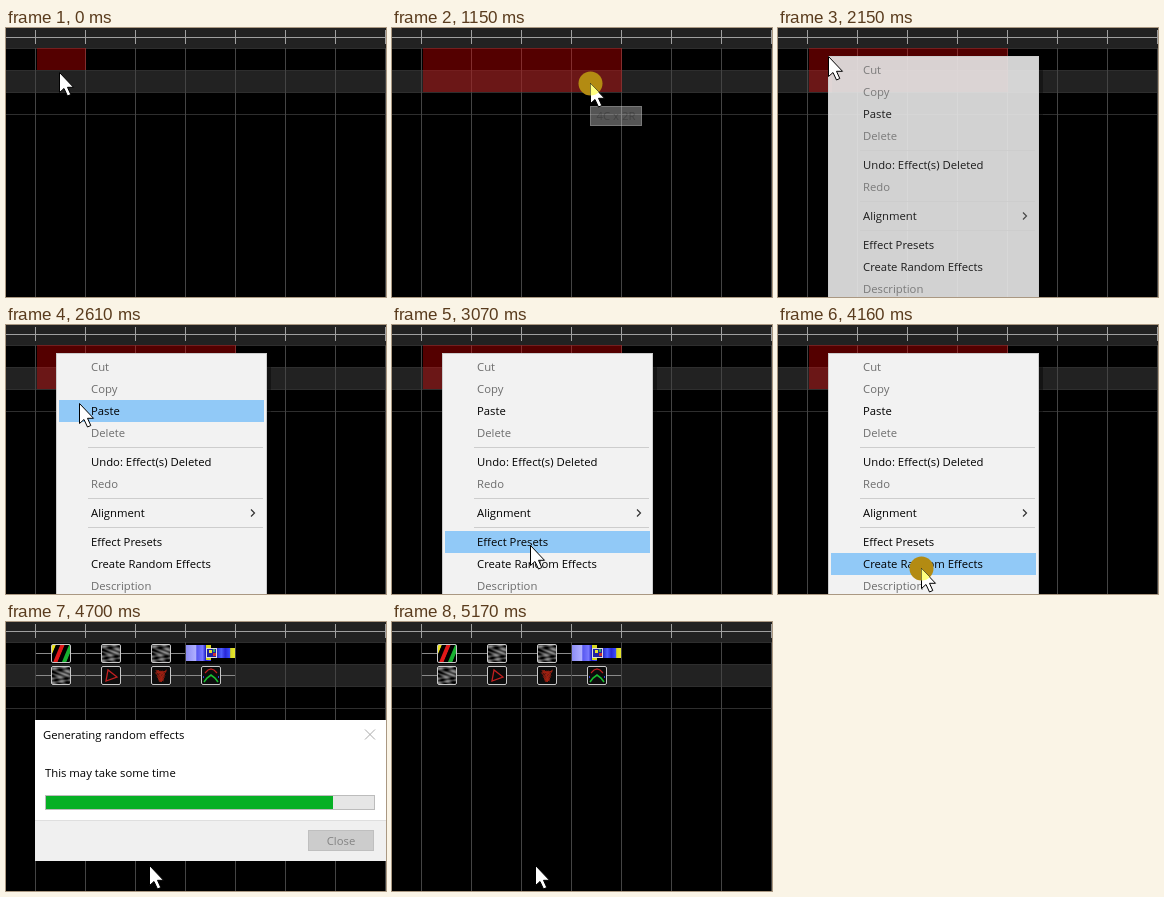
Animation of 380 by 269 pixels, one loop 6480 ms. Source, as an HTML page with a canvas:

```html
<!DOCTYPE html>
<html lang="en">
<head>
<meta charset="utf-8">
<style>
  html, body { margin: 0; width: 100%; height: 100%; overflow: hidden; background: #000; }
  canvas { display: block; }
</style>
</head>
<body>
<canvas id="stage" width="380" height="269"></canvas>
<script>
const ctx = document.getElementById('stage').getContext('2d');
const LOOP = 6480, TICK = 76.9;
const LEFT = 30, COL = 50;

// Pointer stops: tick, x, y
const stops = [
  [0, 53, 44], [4, 47, 28], [5, 47, 28], [13, 198, 55], [15, 198, 55], [23, 53, 29],
  [24, 50, 28], [31, 50, 28], [40, 138, 220], [43, 142, 242], [47, 142, 242], [48, 143, 243]
];

// Menu rows: label, middle y, enabled
const menuItems = [
  ['Cut', 42], ['Copy', 64], ['Paste', 86, true], ['Delete', 108],
  ['Undo: Effect(s) Deleted', 137, true], ['Redo', 159], ['Alignment', 188, true],
  ['Effect Presets', 217, true], ['Create Random Effects', 239, true], ['Description', 261]
];

const clamp = (v, lo = 0, hi = 1) => Math.min(hi, Math.max(lo, v));

function rect(x, y, w, h, color) {
  ctx.fillStyle = color;
  ctx.fillRect(x, y, w, h);
}

function frame(x, y, w, h, color) {
  ctx.strokeStyle = color;
  ctx.lineWidth = 1;
  ctx.strokeRect(x + .5, y + .5, w - 1, h - 1);
}

function line(points, color, width = 1) {
  ctx.beginPath();
  points.forEach(([x, y]) => ctx.lineTo(x, y));
  ctx.strokeStyle = color;
  ctx.lineWidth = width;
  ctx.stroke();
}

function text(label, x, middle, color = '#000', align = 'left') {
  ctx.font = '11.3px "Open Sans", sans-serif';
  ctx.textAlign = align;
  ctx.fillStyle = color;
  ctx.fillText(label, x, middle + 4);
}

function layer(alpha, draw) {
  ctx.save();
  ctx.globalAlpha = alpha;
  draw();
  ctx.restore();
}

function pointerAt(tick) {
  const next = stops.findIndex(s => s[0] > tick);
  if (next < 0) return stops.at(-1).slice(1);
  const [t0, x0, y0] = stops[next - 1], [t1, x1, y1] = stops[next];
  const p = (tick - t0) / (t1 - t0), ease = p * p * (3 - 2 * p);
  return [Math.round(x0 + (x1 - x0) * ease), Math.round(y0 + (y1 - y0) * ease)];
}

function drawGrid() {
  rect(0, 0, 380, 269, '#000');
  rect(0, 0, 380, 20, '#222');
  rect(0, 42, 380, 22, '#222');
  for (const y of [20, 42, 64, 86]) rect(0, y, 380, 1, '#2e2e2e');
  rect(0, 9, 380, 1, '#a0a0a0');
  for (let x = LEFT - 1; x < 380; x += COL) {
    rect(x, 20, 1, 249, '#444');
    rect(x, 2, 1, 14, '#a0a0a0');
  }
}

// Effect pictures, drawn in an 18 x 18 box
function stripes() {
  ['#e8e020', '#000', '#e01818', '#000', '#18b030', '#000', '#e8e020'].forEach((color, i) =>
    line([[i * 4.4 - 7, 21], [i * 4.4 + 3, -3]], color, 4.2));
}

function plasma() {
  for (let y = 0; y < 18; y++) for (let x = 0; x < 18; x++) {
    const v = Math.sin(x * .42 + Math.sin(y * .5) * 1.6) * Math.sin(y * .85 - x * .18 + 1);
    const g = Math.round(65 + 75 * v);
    rect(x, y, 1, 1, `rgb(${g},${g},${g})`);
  }
}

function triangle() {
  line([[6, 3], [15, 10], [4, 14], [6, 3], [15, 10]], '#c02020', 1.3);
}

function scribble() {
  const points = Array.from({ length: 34 }, (_, i) =>
    [9 + 6 * Math.sin(i * 2.3) * Math.cos(i * .4), 9 + 6 * Math.cos(i * 1.7)]);
  line(points, 'rgba(165,35,20,.75)', .8);
}

function arcs() {
  line([[3, 6], [6, 3], [9, 2], [12, 3], [15, 6]], '#c02020', 1.2);
  line([[2, 15], [5, 11], [9, 8], [13, 11], [16, 15]], '#18c030', 1.6);
  rect(1, 9, 1, 2, '#3040d0');
  rect(16, 9, 1, 2, '#3040d0');
}

function colorBar() {
  const g = ctx.createLinearGradient(0, 0, 49, 0);
  [[0, '#8c8cf4'], [.2, '#b0b0ff'], [.22, '#5858f0'], [.34, '#7878ff'], [.4, '#2020c8'],
   [.48, '#4040f0'], [.62, '#2020b8'], [.72, '#5060ff'], [.8, '#2828d8'], [.9, '#3c50ff'],
   [.91, '#d8d820'], [1, '#e8e830']].forEach(s => g.addColorStop(...s));
  rect(0, 0, 25, 16, g);
  rect(25, 3, 24, 10, g);
  rect(20, 0, 5, 15, '#d8d820');
  rect(21, 3, 10, 10, '#2020a0');
  rect(23, 5, 3, 3, '#e8e030');
  rect(27, 8, 3, 3, '#d03030');
  rect(27, 4, 2, 3, '#30b060');
  frame(20, 3, 11, 10, '#ddd');
}

const effects = [stripes, plasma, plasma, colorBar, plasma, triangle, scribble, arcs];

function drawEffect(draw, i) {
  const x = LEFT + i % 4 * COL, y = i < 4 ? 31 : 53;
  ctx.save();
  if (draw === colorBar) {
    ctx.translate(x, y - 8);
    draw();
  } else {
    rect(x, y, 49, 1, '#8a8a8a');
    ctx.translate(x + 16, y - 8);
    rect(-1, -1, 20, 19, '#0c0c0c');
    ctx.save();
    ctx.beginPath();
    ctx.rect(0, 0, 18, 17);
    ctx.clip();
    draw();
    ctx.restore();
    ctx.beginPath();
    ctx.roundRect(-.5, -.5, 19, 18, 1.5);
    ctx.strokeStyle = '#c8c8c8';
    ctx.lineWidth = 1;
    ctx.stroke();
  }
  ctx.restore();
}

function drawSelection(tick, x, y) {
  let cols = 1, rows = 1;
  if (tick >= 13) [cols, rows] = [4, 2];
  else if (tick >= 6) {
    cols = Math.floor((x - LEFT) / COL) + 1;
    rows = y > 42 ? 2 : 1;
  }
  rect(31, 20, cols * COL - 1, rows * 22, 'rgba(255,0,0,.33)');
}

function drawTooltip() {
  rect(198, 78, 52, 20, '#f4f4f4');
  frame(198, 78, 52, 20, '#bbb');
  text('4C x 2R', 224, 88, '#222', 'center');
}

function drawItem([label, middle, enabled], hovered) {
  if (hovered) rect(53, middle - 11, 205, 22, enabled ? '#91c9f7' : '#e6e6e6');
  text(label, 85, middle, enabled ? '#000' : '#6d6d6d');
}

function drawMenu(pointerX, pointerY) {
  rect(54, 32, 211, 240, 'rgba(0,0,0,.4)');
  rect(50, 28, 211, 245, '#f2f2f2');
  frame(50, 28, 211, 245, '#ccc');
  for (const y of [122, 173, 202]) rect(82, y, 175, 1, '#cdcdcd');
  for (const item of menuItems)
    drawItem(item, pointerX > 53 && Math.abs(pointerY - item[1]) < 11);
  line([[245, 184.5], [248.5, 188], [245, 191.5]], '#333', 1.2);
}

function drawDialog(scale, progress) {
  ctx.translate(204, 168.5);
  ctx.scale(scale, scale);
  ctx.translate(-204, -168.5);
  rect(29, 98, 351, 141, '#fff');
  rect(29, 198, 351, 41, '#f0f0f0');
  rect(29, 198, 351, 1, '#dfdfdf');
  text('Generating random effects', 37, 113);
  text('This may take some time', 39, 151);
  line([[359, 107.5], [369, 117.5]], '#aaa');
  line([[369, 107.5], [359, 117.5]], '#aaa');
  rect(39, 173, 330, 15, '#e6e6e6');
  rect(40, 174, 328 * progress, 13, '#06b025');
  frame(39, 173, 330, 15, '#bcbcbc');
  rect(302, 208, 66, 21, '#ccc');
  frame(302, 208, 66, 21, '#bfbfbf');
  text('Close', 335, 218.5, '#838383', 'center');
}

function drawPointer(x, y, pressed) {
  const disc = new Path2D(), arrow = new Path2D('M0 0V20L4.5 16 8 23.5 11.3 22 8 14.8H14Z');
  disc.arc(0, 0, 12, 0, 7);
  ctx.save();
  ctx.translate(x + .5, y + .5);
  if (pressed) {
    ctx.fillStyle = '#b38b12';
    ctx.fill(disc);
  }
  ctx.fillStyle = '#fff';
  ctx.fill(arrow);
  ctx.strokeStyle = '#000';
  ctx.lineWidth = 1;
  ctx.stroke(arrow);
  if (pressed) {
    ctx.clip(disc);
    ctx.fillStyle = '#ffff80';
    ctx.fill(arrow);
  }
  ctx.restore();
}

function render(time) {
  const tick = Math.floor((time + 12) / TICK);
  const [x, y] = pointerAt(tick);
  const made = clamp(Math.floor(1 + (tick - 56) * 1.4), 0, 8);

  drawGrid();
  effects.slice(0, made).forEach(drawEffect);
  if (tick < 61) drawSelection(tick, x, y);

  if (tick === 15 || tick === 16) layer(tick === 15 ? .35 : 1, drawTooltip);
  if (tick >= 27 && tick < 55) layer([.4, .87][tick - 27] ?? 1, () => drawMenu(x, y));

  if (tick >= 56 && tick < 65) {
    const shown = tick === 64 ? .4 : clamp(.37 + (tick - 56) * .4);
    layer(shown, () => drawDialog(.95 + .05 * shown, (made - 1) / 8));
  }
  if (tick >= 55 && tick < 59)
    layer(.62 + (56 - tick) * .25, () => drawItem(menuItems[8], true));

  drawPointer(x, y, tick >= 6 && tick <= 15 || tick === 27 || tick === 54);
}

function play() {
  render(performance.now() % LOOP);
  requestAnimationFrame(play);
}
play();
</script>
</body>
</html>
```
